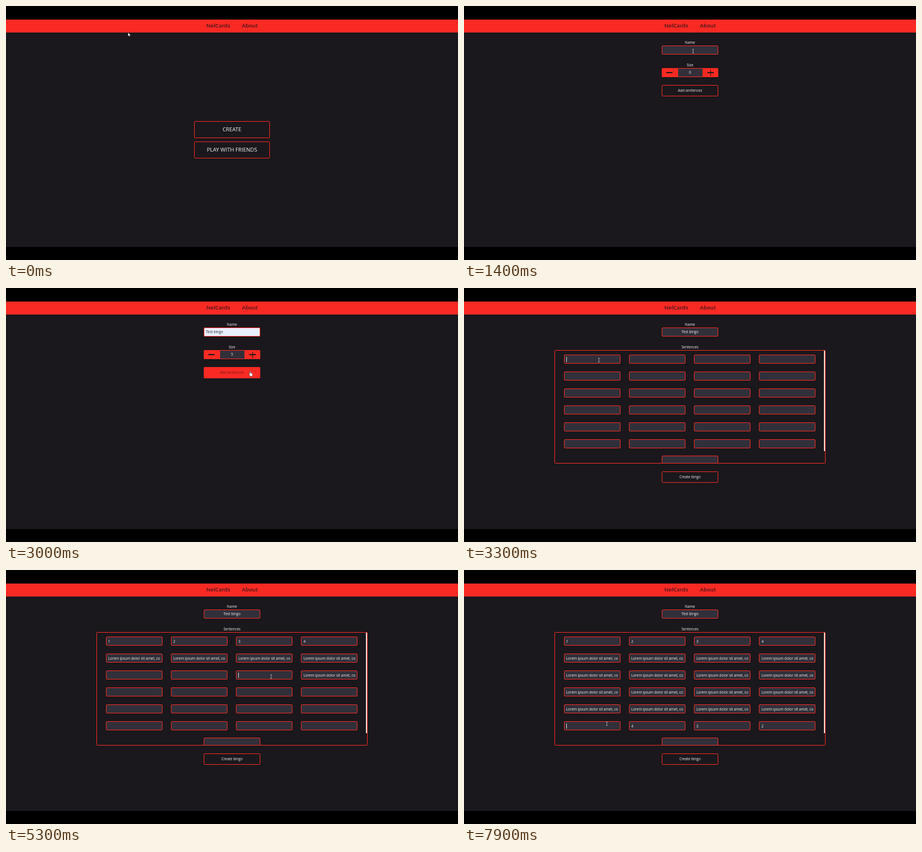
An HTML page that plays this animation: 800 by 450 pixels, repeating every 8000 ms.

```html
<!DOCTYPE html>
<html lang="en">
<head>
<meta charset="utf-8">
<title>Bingo maker</title>
<style>
  :root { --red: #f92a23; --bg: #1a181c; --field: #31303a; }
  html, body { margin: 0; width: 100%; height: 100%; overflow: hidden; background: #000; }
  #stage { position: absolute; left: 0; top: 0; width: 800px; height: 450px; overflow: hidden;
    font: 6.35px/1 "Open Sans", "Noto Sans", sans-serif; color: #f4f2f2; }
  #stage div { position: absolute; box-sizing: border-box; }
  #app { left: 0; top: 24px; width: 800px; height: 403px; background: var(--bg); }
  #bar { left: 0; top: 24px; width: 800px; height: 22.5px; background: var(--red); }
  .link { top: 24px; height: 22px; line-height: 22px; font-size: 9.7px; font-weight: 600; color: #43161a; }
  .page { left: 0; top: 0; width: 800px; height: 450px; visibility: hidden; }
  .page.on { visibility: visible; }
  .label, .btn { text-align: center; white-space: nowrap; }
  .btn { border: 1.5px solid var(--red); border-radius: 1.5px; display: flex;
    align-items: center; justify-content: center; }
  .big { font-size: 9.65px; }
  .hot { background: var(--red); color: #7a1b1a; }
  .field { background: var(--field); border: 1.5px solid var(--red); border-radius: 2px;
    padding: 0 3px; display: flex; align-items: center; }
  .field > span { flex: 1; min-width: 0; display: flex; overflow: hidden; }
  .field i { font-style: normal; white-space: pre; flex: none; height: 9px; line-height: 9px; }
  .field.focus i { border-right: .7px solid #ddd; }
  .field.focus > span { justify-content: flex-start; }
  .field.tail > span { justify-content: flex-end; }
  .field.mid > span { justify-content: center; }
  .field.filled { background: #e8f0fe; color: #222; }
  .red { background: var(--red); border-radius: 1.5px; }
  .ink { background: var(--bg); }
  #mouse { position: absolute; left: 0; top: 0; }
</style>
</head>
<body>
<div id="stage">
  <div id="app"></div>
  <div id="bar"></div>
  <div class="link" style="left:354.5px">NelCards</div>
  <div class="link" style="left:417.5px">About</div>
  <div class="page" id="home"></div>
  <div class="page" id="form"></div>
  <div class="page" id="list"></div>
  <svg id="mouse" width="800" height="450">
    <path data-kind="arrow" fill="#fff" stroke="#000" stroke-width=".4"
      d="M0 0V6.6L1.5 5.3 2.5 7.6 3.6 7.1 2.6 4.9H4.7Z"/>
    <path data-kind="hand" fill="#fff" stroke="#222" stroke-width=".5"
      d="M-1.6-4.4Q-.8-5.2-.1-4.4V-1.4L2.6-.8Q3.7-.4 3.6.8L2.9 3.2V4.6H-1.2V3.4L-3.2.6Q-3.4-.6-2.4-.4L-1.6.4Z"/>
    <path data-kind="beam" fill="none" stroke="#b9b9bd" stroke-width=".8"
      d="M-1.5-3.3H1.5M0-3.3V3.3M-1.5 3.3H1.5"/>
  </svg>
</div>
<script>
const LOOP = 8000, STEP = 100;
const HOME_END = 800, FORM_END = 3100;
const HEAD = "Lorem ipsum dolor sit amet, consectetur";
const TAIL = "Nulla at blandit diam nec, porta augue";
const $ = id => document.getElementById(id);

function box(parent, cls, x, y, w, h, text = "") {
  const el = document.createElement("div");
  el.className = cls;
  el.style.cssText = `left:${x}px;top:${y}px;width:${w}px;height:${h}px`;
  el.textContent = text;
  parent.append(el);
  return el;
}

function field(parent, x, y, w = 100, h = 16.5, cls = "") {
  const el = box(parent, "field " + cls, x, y, w, h);
  el.innerHTML = "<span><i></i></span>";
  return el;
}

function fill(el, text, focus = false, tail = false) {
  el.querySelector("i").textContent = text;
  el.classList.toggle("focus", focus);
  el.classList.toggle("tail", tail);
}

const label = (parent, y, text) => box(parent, "label", 350, y - 3.5, 100, 8, text);

// Start page
const create = box($("home"), "btn big", 333, 204, 134, 29.5, "CREATE");
box($("home"), "btn big", 333, 240, 134, 29.5, "PLAY WITH FRIENDS");

// Name and size
label($("form"), 65, "Name");
const nameField = field($("form"), 350, 69.7);
label($("form"), 105, "Size");
box($("form"), "red", 350, 109.7, 100, 16.8);
const size = box($("form"), "btn", 377.5, 110, 45, 16);
size.style.background = "var(--field)";
box($("form"), "ink", 358, 117.3, 11, 1.7);
box($("form"), "ink", 431, 117.3, 11, 1.7);
box($("form"), "ink", 435.6, 112.8, 1.7, 10.8);
const add = box($("form"), "btn", 350, 139.5, 100, 20.5, "Add sentences");

// Sentence grid
label($("list"), 65, "Name");
fill(field($("list"), 350, 69.7, 100, 16.5, "mid"), "Test bingo");
label($("list"), 105, "Sentences");
const panel = box($("list"), "btn", 160, 109.7, 480, 201.8);
panel.style.cssText += ";display:block;overflow:hidden";
field(panel, 188.5, 186.5);
box($("list"), "", 637, 110.5, 2, 178.5).style.background = "#f6ded4";
box($("list"), "btn", 350, 325, 100, 20.3, "Create bingo");

const cellX = col => 176.8 + (col - 1) * 115.2;
const cellY = row => 117.8 + (row - 1) * 30;
const cells = {};
for (let row = 1; row <= 6; row++)
  for (let col = 1; col <= 4; col++)
    cells[`${row}${col}`] = field($("list"), cellX(col), cellY(row));

// Row+column visited, in order; text follows one step after focus
const visits = [];
function visit(start, gap, route, words = []) {
  route.split(" ").forEach((key, i) =>
    visits.push({ at: start + i * gap, key, word: words[i], dx: 62, dy: 10 }));
}
visit(3300, 200, "11 12 13 14", ["1", "2", "3", "4"]);
visit(4300, 200, "21 22 23 24 34 33 32 31 41 42");
visit(6250, 150, "51 52");
visit(6600, 200, "43 44");
visit(6950, 150, "54 53");
visit(7300, 200, "64 63 62 61", ["2", "3", "4", "1"]);
const nudge = (key, dx, dy) => Object.assign(visits.find(v => v.key === key), { dx, dy });
nudge("21", 82, 8.5);
nudge("33", 62, 11);
nudge("43", 26, 11);
nudge("61", 76, 4.5);

// Pointer on the first two pages: time, x, y
const path = [
  [0, 216, 47], [100, 216, 47], [500, 425, 224], [900, 425, 224], [1300, 405.5, 80],
  [1700, 405.5, 80], [2000, 437, 120], [2500, 437, 120], [2600, 433, 152]
];

function pointer(t) {
  if (t >= FORM_END + STEP) {
    const v = visits.filter(v => v.at - STEP <= t).pop();
    return [cellX(+v.key[1]) + v.dx, cellY(+v.key[0]) + v.dy, "beam"];
  }
  const i = path.findIndex(p => p[0] > t);
  let [, x, y] = path[path.length - 1];
  if (i > 0) {
    const [t0, x0, y0] = path[i - 1], [t1, x1, y1] = path[i];
    const k = (t - t0) / (t1 - t0);
    x = x0 + (x1 - x0) * k;
    y = y0 + (y1 - y0) * k;
  }
  const kind = t >= 1300 && t < 1800 ? "beam"
    : (t >= 500 && t < HOME_END) || (t >= 2000 && t < FORM_END) ? "hand" : "arrow";
  return [x, y, kind];
}

function draw(t) {
  $("home").classList.toggle("on", t < HOME_END);
  $("form").classList.toggle("on", t >= HOME_END && t < FORM_END);
  $("list").classList.toggle("on", t >= FORM_END);

  create.classList.toggle("hot", t >= 500);
  add.classList.toggle("hot", t >= 2600);
  const auto = t >= 1800;
  nameField.classList.toggle("filled", auto);
  fill(nameField, auto ? "Test bingo" : t >= 1700 ? "T" : "", t >= 1600 && t < 1800);
  size.textContent = Math.max(0, Math.min(5, (t - 2000) / 100));

  visits.forEach((v, i) => {
    const next = visits[i + 1];
    const focus = t >= v.at && (!next || t < next.at);
    const done = t >= v.at + STEP;
    const long = !v.word;
    fill(cells[v.key], !done ? "" : v.word || (focus ? TAIL : HEAD), focus, focus && done && long);
  });

  const [x, y, kind] = pointer(t);
  for (const shape of $("mouse").children) {
    shape.setAttribute("visibility", shape.dataset.kind === kind ? "visible" : "hidden");
    shape.setAttribute("transform", `translate(${x} ${y})`);
  }
}

const begin = performance.now();
function tick() {
  const t = (performance.now() - begin) % LOOP;
  draw(Math.floor(t / STEP) * STEP);
  requestAnimationFrame(tick);
}
tick();
</script>
</body>
</html>
```
